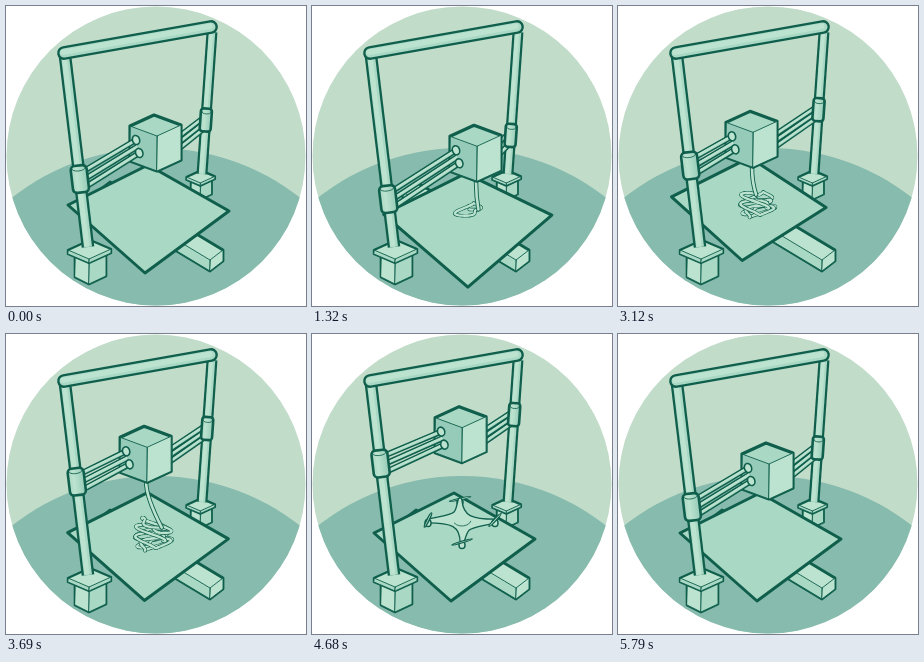
An HTML page with a canvas for the animation above (6.03 s loop, 300 px wide and 300 px high).

```html
<!DOCTYPE html>
<html lang="en">
<head>
<meta charset="utf-8">
<title>3D printer</title>
<style>
html, body { margin: 0; width: 100%; height: 100%; overflow: hidden; background: #fff; }
canvas { display: block; width: 300px; height: 300px; }
</style>
</head>
<body>
<canvas id="stage"></canvas>
<script>
const LOOP = 6030, STEP = 30, LAST = 5790;
const INK = '#0f5f4c', LIGHT = '#bce3cf', PALE = '#a9d8c4', MID = '#95cbb8', DEEP = '#74b3a1';
const canvas = document.getElementById('stage');
const ctx = canvas.getContext('2d');
const dpr = window.devicePixelRatio || 1;
canvas.width = canvas.height = 300 * dpr;

// Turning points of the bed and the print head: [time, offset]
const BED = [[0, 0], [1400, 17], [3080, -15], [3780, 0]];
const HEAD = [[0, 0], [1320, 14], [3120, -16], [4410, -1], [5670, 0]];

const clamp = v => Math.min(1, Math.max(0, v));
const mix = (a, b, k) => a + (b - a) * k;
const span = (t, from, to) => clamp((t - from) / (to - from));
const ease = k => (1 - Math.cos(Math.PI * k)) / 2;
const add = (a, b) => [a[0] + b[0], a[1] + b[1]];

function sample(keys, t) {
  const i = keys.findIndex(([time]) => t < time);
  if (i < 1) return keys[keys.length - 1][1];
  const [[t0, a], [t1, b]] = [keys[i - 1], keys[i]];
  return mix(a, b, ease(span(t, t0, t1)));
}

// Height of the gantry: sinks, climbs layer by layer, then returns
function gantryAt(t) {
  if (t < 1260) return 16 * ease(span(t, 0, 660));
  if (t < 4590) return mix(16, -34, span(t, 1260, 4560) ** 1.12);
  return -34 * (1 - ease(span(t, 4590, 5670)));
}

function stroke(color, width) {
  ctx.strokeStyle = color;
  ctx.lineWidth = width;
  ctx.stroke();
}

function shape(fill, width) {
  ctx.fillStyle = fill;
  ctx.fill();
  stroke(INK, width);
}

function trace(pts) {
  ctx.beginPath();
  pts.forEach(p => ctx.lineTo(...p));
}

function line(pts, color, width) {
  trace(pts);
  stroke(color, width);
}

function poly(pts, fill, width) {
  trace(pts);
  ctx.closePath();
  shape(fill, width);
}

function oval(x, y, rx, ry, fill, width, turn = 0) {
  ctx.beginPath();
  ctx.ellipse(x, y, rx, ry, turn, 0, 7);
  shape(fill, width);
}

// Box from its left top corner: u runs to the back, v to the front, h is the height
function box(left, u, v, h, edge, [top, side, end]) {
  const back = add(left, u), front = add(left, v), right = add(front, u);
  const low = p => add(p, [0, h]);
  poly([left, back, right, low(right), low(front), low(left)], top, edge);
  poly([left, front, low(front), low(left)], side, 0.9);
  poly([front, right, low(right), low(front)], end, 0.9);
}

// Outlined tube with a shaded flank
function tube(a, b, width, edge, cap = 'butt') {
  ctx.lineCap = cap;
  line([a, b], INK, width + edge * 2);
  line([a, b], PALE, width);
  const shift = [-width * 0.12, -width * 0.08];
  line([add(a, shift), add(b, shift)], LIGHT, width * 0.6);
  ctx.lineCap = 'round';
}

function collar([x, y], w, h, tilt) {
  ctx.save();
  ctx.translate(x, y);
  ctx.rotate(tilt);
  ctx.beginPath();
  ctx.roundRect(-w / 2, -h / 2, w, h, w * 0.26);
  const shade = ctx.createLinearGradient(-w / 2, 0, w / 2, 0);
  [PALE, LIGHT, PALE, MID].forEach((c, i) => shade.addColorStop(i / 3, c));
  shape(shade, 2.6);
  ctx.beginPath();
  ctx.ellipse(0, -h / 2 + 3, w * 0.42, 2.4, 0, 0, Math.PI);
  stroke(INK, 0.8);
  ctx.restore();
}

function backdrop() {
  ctx.fillStyle = '#fff';
  ctx.fillRect(0, 0, 300, 300);
  ctx.save();
  ctx.beginPath();
  ctx.arc(150, 150, 149.5, 0, 7);
  ctx.clip();
  ctx.fillStyle = '#c2dcca';
  ctx.fillRect(0, 0, 300, 300);
  ctx.beginPath();
  ctx.arc(150, 376, 234, 0, 7);
  ctx.fillStyle = '#86bbad';
  ctx.fill();
  ctx.restore();
}

function foot(x, y, s) {
  const at = (px, py) => [x + px * s, y + py * s];
  const dir = (px, py) => [px * s, py * s];
  box(at(-15, 5), dir(17, -8), dir(14, 7), 22 * s, 2.6, [LIGHT, LIGHT, PALE]);
  box(at(-22, 0), dir(22, -10), dir(21, 9), 4 * s, 2.4, [LIGHT, PALE, PALE]);
}

function bed(d) {
  const corners = [
    [62 + d * 0.57, 199 + d * 0.55],
    [142 + d * 0.7, 159 + d * 0.5],
    [223 + d, 205 + d * 0.24],
    [139 + d, 267 + d * 0.84]
  ];
  poly(corners, PALE, 3);
}

// Loops that sweep slowly up and down the bed
const loopPt = (a, d, size) => [
  148 + d * 0.55 + size * (14 * Math.sin(a) + 5 * Math.sin(a * 2.3)),
  199 + d * 0.3 + size * (12 * Math.sin(a * 0.13 - 0.6) + 6 * Math.cos(a * 1.15))
];

function filament(t, d, nozzle) {
  if (t < 690 || t >= 4560) return;
  const k = span(t, 690, 4290);
  const pts = [];
  for (let a = 0; a <= k * 46; a += 0.12) pts.push(loopPt(a, d, mix(0.7, 1.05, k)));
  ctx.save();
  ctx.globalAlpha = 1 - span(t, 4410, 4560);
  // Short overlapping pieces make the crossings read as over and under
  for (let i = 0; i < pts.length; i += 10) {
    line(pts.slice(i, i + 11), INK, 3.6);
    line(pts.slice(Math.max(0, i - 3), i + 11), LIGHT, 2.3);
  }
  if (t < 4290) {
    ctx.beginPath();
    ctx.moveTo(...nozzle);
    ctx.quadraticCurveTo(nozzle[0], nozzle[1] + 15, ...pts[pts.length - 1]);
    stroke(INK, 4.4);
    stroke(LIGHT, 2.6);
  }
  ctx.restore();
}

function carriage(at, cl, cr) {
  const rods = [0, 1, 2].map(i => i * 6.5);
  for (const r of rods) tube(add(at, [30, 36 + r]), add(cr, [0, r * 0.85 - 4]), 2.8, 1.5);
  box(add(at, [0, 11]), [24, -11], [27, 10], 35, 3.2, [PALE, MID, LIGHT]);
  for (const r of rods) {
    const nut = add(at, [6 + r * 0.25, 25 + r]);
    tube(add(cl, [4, r * 1.3 - 8]), nut, 3, 1.5);
    if (r !== rods[1]) oval(...nut, 3.6, 4.6, LIGHT, 1.6, -0.3);
  }
}

function rotor([x, y], turn) {
  oval(x, y + 2, 3, 3.6, LIGHT, 1.5);
  ctx.save();
  ctx.translate(x, y - 1);
  ctx.scale(1, 0.7);
  ctx.rotate(turn);
  oval(0, 0, 11, 1.2, LIGHT, 1.5);
  ctx.restore();
}

function drone(t) {
  if (t < 4410) return;
  const fly = ease(span(t, 5040, 5700));
  const spin = Math.max(0, t - 4950) * 0.031;
  const size = mix(1, 1.75, fly);
  const tips = [[-34, 0], [-2, -21], [33, 0], [0, 22]];
  ctx.save();
  ctx.globalAlpha = Math.min(span(t, 4410, 4560), 1 - span(t, 5670, LAST));
  ctx.translate(mix(150, 157, fly), mix(187, 150, fly));
  ctx.scale(size, size);
  rotor(tips[1], spin - 0.3);
  ctx.beginPath();
  ctx.moveTo(...tips[0]);
  tips.forEach(([x, y], i) => {
    const [nx, ny] = tips[(i + 1) % 4];
    ctx.bezierCurveTo(x * 0.15, y * 0.15 + ny * 0.3, nx * 0.3 + x * 0.15, ny * 0.15, nx, ny);
  });
  ctx.closePath();
  stroke(INK, 5);
  stroke(LIGHT, 2.4);
  ctx.fillStyle = LIGHT;
  ctx.fill();
  ctx.beginPath();
  ctx.ellipse(0, -1, 9, 6, 0, 0.2, 2.6);
  stroke(INK, 0.8);
  rotor(tips[0], 1.9 - spin);
  rotor(tips[2], -1 - spin);
  rotor(tips[3], spin - 0.4);
  ctx.restore();
}

function draw(t) {
  const g = gantryAt(t), d = sample(BED, t), hx = sample(HEAD, t);
  const postAt = (a, b, y) => [mix(a[0], b[0], (y - a[1]) / (b[1] - a[1])), y];
  const nearTop = [59, 50], nearEnd = [82, 241];
  const farTop = [206, 26], farEnd = [196, 168];
  const cl = postAt(nearTop, nearEnd, 173 + g * 1.3);
  const cr = postAt(farTop, farEnd, 114 + g);
  const at = [124 + hx, 109 + g * 1.1 - hx * 0.48];

  ctx.setTransform(dpr, 0, 0, dpr, 0, 0);
  ctx.lineJoin = ctx.lineCap = 'round';
  backdrop();
  foot(195, 171, 0.66);
  tube(farTop, farEnd, 6.5, 2.2);
  box([91, 186], [13, -10], [113, 68], 11, 2.8, [LIGHT, PALE, LIGHT]);
  bed(d);
  filament(t, d, add(at, [26, 56]));
  foot(84, 244, 1);
  tube(nearTop, nearEnd, 8, 2.3);
  tube([58, 47], [205, 21], 9, 2.4, 'round');
  carriage(at, cl, cr);
  collar(cl, 16, 27, -0.12);
  collar(cr, 11, 23, 0.07);
  drone(t);
}

const start = performance.now();
function tick() {
  const t = (performance.now() - start) % LOOP;
  draw(Math.min(LAST, Math.floor(t / STEP) * STEP));
  requestAnimationFrame(tick);
}
tick();
</script>
</body>
</html>
```
